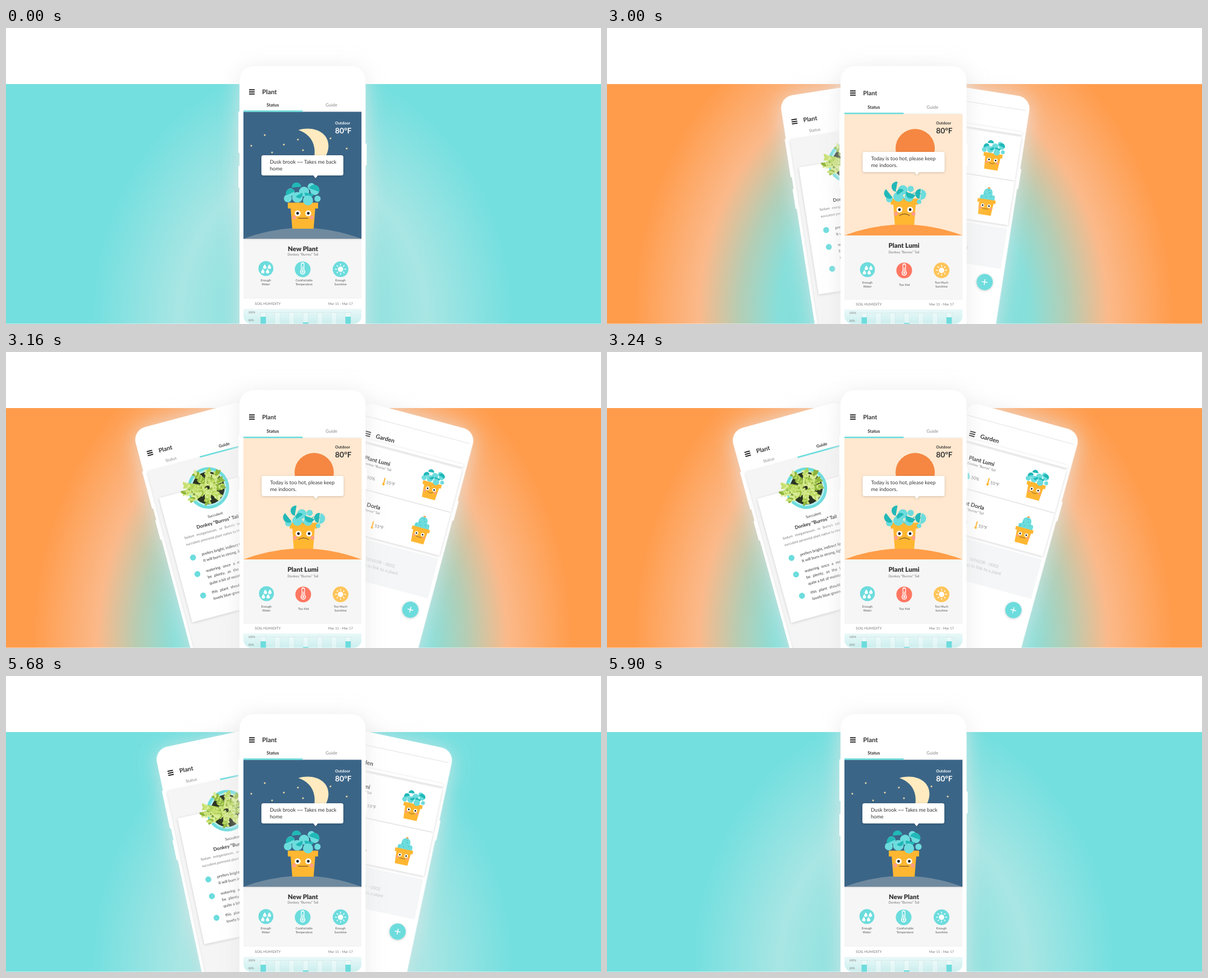
Recreate the animation shown at these times as an HTML page. Size 1060x528 px, loop 7.94 s.

```html
<!DOCTYPE html>
<html lang="en">
<head>
<meta charset="utf-8">
<title>Plant app</title>
<style>
  html, body { margin: 0; width: 100%; height: 100%; overflow: hidden; background: #fff; }
  svg { display: block; width: 100vw; height: 100vh; }
  text { font-family: Lato, "Open Sans", sans-serif; text-rendering: geometricPrecision; white-space: pre; }
  .phone { filter: drop-shadow(0 3px 18px rgba(230, 230, 230, .8)); }
  .raised { filter: drop-shadow(0 1px 2px rgba(0, 0, 0, .18)); }
</style>
</head>
<body>
<svg id="stage" viewBox="0 0 1060 528" preserveAspectRatio="none"></svg>
<script>
const TEAL = '#6ddcdd', DARK_TEAL = '#22b8b8', INK = '#333', GREY = '#777', ORANGE = '#ffb732';
const LOOP = 7940, FAN_ANGLE = 15.4;

// Drawing helpers; text is placed by its vertical centre.
const text = (x, y, s, size, { w = 400, c = INK, a = 'start', ws = 0 } = {}) =>
  `<text x="${x}" y="${y + size * .35}" font-size="${size}" font-weight="${w}" fill="${c}" text-anchor="${a}" word-spacing="${ws}">${s}</text>`;
const mid = (x, y, s, size, o = {}) => text(x, y, s, size, { ...o, a: 'middle' });
const rect = (x, y, w, h, c, extra = '') => `<rect x="${x}" y="${y}" width="${w}" height="${h}" fill="${c}" ${extra}/>`;
const dot = (x, y, r, c) => `<circle cx="${x}" cy="${y}" r="${r}" fill="${c}"/>`;
const path = (d, c, extra = '') => `<path d="${d}" fill="${c}" ${extra}/>`;
const line = (d, c, w = 1) => path(d, 'none', `stroke="${c}" stroke-width="${w}" stroke-linecap="round"`);
const group = (transform, s) => `<g transform="${transform}">${s}</g>`;
const raised = s => `<g class="raised">${s}</g>`;
const half = (x, y, r, turn, c) =>
  group(`translate(${x} ${y}) rotate(${turn})`, path(`M${-r} 0A${r} ${r} 0 0 1 ${r} 0Z`, c));
const menu = (x, y) => [-3.7, 0, 3.7].map(d => rect(x - 5, y + d - .9, 10, 1.8, '#111')).join('');

const pot = () => path('M507 321H551L548 358H510Z', ORANGE) + rect(502, 311.5, 54, 10.5, ORANGE, 'rx="1"');

function face(x, y, mouth) {
  const eye = dx => dot(x + dx, y, 5.3, '#fff') + dot(x + dx, y, 2.4, '#222');
  const cheek = dx => dot(x + dx, y + 7.5, 3.4, '#ff9d88');
  return cheek(-15.5) + cheek(15.5) + eye(-9.5) + eye(9.5) + line(mouth, '#5b3a1c', 1);
}

const leaves = (discs, halves) =>
  discs.map(d => dot(...d, TEAL)).join('') + halves.map(h => half(...h, DARK_TEAL)).join('');

function happyPlant(mouth) {
  return leaves(
    [[502, 304, 7], [507, 293, 7], [519, 302, 9.5], [531, 292, 9], [544, 283, 6.5], [550, 290, 8], [555, 304.5, 5.5]],
    [[517.5, 284, 8.5, -5], [507, 295, 8.5, -25], [549, 289, 9.5, 20], [540, 295, 8, 190], [522, 297, 6.5, 150]]) +
    pot() + dot(538, 307.5, 9, TEAL) + face(529, 330.5, mouth);
}

function sadPlant() {
  const stems = line('M524 308Q518 290 510 290M535 306Q548 288 559 296M530 306Q524 294 520 290', DARK_TEAL, 1.2);
  return group('translate(530 351) scale(.91 1) translate(-529 -358)', pot()) + stems +
    leaves([[527, 289, 8.5], [541, 287, 5.5], [519, 301, 9], [503, 305, 6], [538, 302, 8], [556, 310, 4]], []) +
    half(559, 297, 9.5, 98, TEAL) +
    leaves([], [[516, 283, 9, -80], [503, 295, 9.5, 232], [523, 294, 7, -35], [541, 295, 9, 200], [558, 296, 9, -82]]) +
    face(530.5, 324, 'M521 334.5Q530 328.5 539 334.5');
}

function cactus() {
  const spots = [[-5, -8], [3, -13], [6, -4], [-2, -1], [-9, 0], [1, -19]];
  const body = path('M-12 6V-2Q-11-7-7-6V-13Q-6-24 1-24Q8-23 8-12V-8Q13-9 13-3V6Z', TEAL) +
    spots.map(([x, y]) => dot(x, y, .9, DARK_TEAL)).join('') + dot(1, -25, 2.2, '#ffa95c');
  return group('translate(0 -5) scale(1.05 .7)', body) +
    group('scale(.6) translate(-529 -314.5)', pot() + face(529, 330.5, 'M521 340H537'));
}

function waterIcon(x, y) {
  const drop = (dx, dy) => path(`M${x + dx} ${y + dy - 4.5}q6 8 0 8.2q-6-.2 0-8.2`, '#fff');
  return dot(x, y, 13.3, TEAL) + drop(-2, -3) + drop(6.2, -3) + drop(-5.5, 5) + drop(3, 5);
}

const thermometer = (x, y, c) =>
  line(`M${x} ${y - 8}V${y + 5}`, '#fff', 6) + dot(x, y + 6, 4.7, '#fff') +
  line(`M${x} ${y - 7.5}V${y + 5}`, c, 3.4) + dot(x, y + 6, 3, c) +
  line(`M${x} ${y - 3}V${y + 5}`, '#fff', 1.3) + dot(x, y + 6, 1.7, '#fff');

function sunIcon(x, y, c) {
  let rays = '';
  for (let i = 0; i < 8; i++) {
    const a = i * Math.PI / 4, p = r => `${x + r * Math.cos(a)} ${y + r * Math.sin(a)}`;
    rays += `M${p(7)}L${p(9.3)}`;
  }
  return dot(x, y, 14, c) + dot(x, y, 4.8, '#fff') + line(rays, '#fff', 1.4);
}

function star(x, y) {
  let d = '';
  for (let i = 0; i < 10; i++) {
    const a = i * Math.PI / 5, r = i % 2 ? 1 : 2.3;
    d += `${i ? 'L' : 'M'}${x + r * Math.sin(a)} ${y - r * Math.cos(a)}`;
  }
  return path(d + 'Z', '#ffe6ab');
}

function bubble(x, y, lines) {
  return raised(rect(x, y, 146, 36, '#fff', 'rx="3.5"') + path(`M${x + 92} ${y + 35.5}h9l-4.5 5.5z`, '#fff')) +
    lines.map((s, i) => text(x + 15, y + 11.5 + i * 12, s, 9.15)).join('');
}

function chart(y) {
  let s = rect(423, y, 210.5, 40, 'url(#chartBg)');
  s += line(`M446 ${y + 6.5}H618M446 ${y + 20.5}H618`, '#d5eaea', .6);
  const tops = [14, 0, 0, 24, 0, 0, 14];
  tops.forEach((top, i) => {
    const x = 453.5 + i * 25.2;
    s += rect(x, y + 6.5, 9.5, 40, '#fff', 'fill-opacity=".35" stroke="#cfe5e6" stroke-width=".6"');
    if (top) s += rect(x, y + top, 9.5, 40, TEAL);
  });
  return s + text(431.5, y + 6.5, '100%', 5, { c: GREY }) + text(432, y + 20.5, '80%', 5, { c: GREY });
}

function phoneBody(x, y, w, k) {
  const r = 25 * k, button = (bx, by, h) => rect(bx, y + by * k, 4, h * k, '#fff', 'rx="1"');
  return `<g class="phone">${rect(x, y, w, 900, '#fff', `rx="${r}"`)}${button(x - 2, 81, 74)}${button(x - 2, 178, 39)}${button(x + w - 2, 138, 39)}</g>`;
}

function screen(v) {
  const label = (x, lines, y) => lines.map((s, i) => mid(x, y + i * 7, s, 5.5, { c: '#555' })).join('');
  return menu(438, v.head) + text(456.3, v.head, 'Plant', v.titleSize, { w: 700 }) +
    mid(475.3, v.tabs, 'Status', 8, { w: 700 }) + mid(579.8, v.tabs, 'Guide', 8, { c: '#888' }) +
    raised(rect(423, v.top, 210.5, v.bottom - v.top, v.sky)) +
    rect(423, v.top - 2.5, 105.5, 2.6, TEAL) + v.scene +
    path(`M423 ${v.bottom}Q528 ${v.bottom - 39} 633.5 ${v.bottom}Z`, v.hill) +
    text(586.3, 170, 'Outdoor', 7, { w: 700, c: v.weather }) + text(586.3, 183.5, '80°F', 13.7, { w: 700, c: v.weather }) +
    bubble(v.bubbleX, v.bubbleY, v.speech) + v.plant +
    rect(423, v.bottom, 210.5, v.panelEnd - v.bottom, '#f6f6f6') +
    rect(423, v.bottom, 210.5, v.edge, 'url(#edge)') +
    mid(529, v.name, v.title, 11.5, { w: 900 }) + mid(529, v.sub, 'Donkey “Burros” Tail', 6.2, { c: GREY }) +
    waterIcon(v.ix, v.iy) + label(v.ix, ['Enough', 'Water'], v.labels) +
    dot(v.ix + 65.5, v.iy + 1.5, 14, v.heat) + thermometer(v.ix + 65.5, v.iy, v.heat) + label(...v.heatLabel) +
    sunIcon(596, v.iy + 1.3, v.sun) + label(596, v.sunLabel, v.labels) +
    line(`M423 ${v.panelEnd}H633`, '#eee', .8) +
    text(443.3, v.soil, 'SOIL HUMIDITY', 6.3, { c: GREY }) + text(574, v.soil, 'Mar 11 - Mar 17', 6.1, { c: GREY }) +
    chart(v.soil + 9);
}

const stars = [[461, 191], [437, 210], [495, 208], [520, 199], [529, 218], [474, 222], [578, 197], [607, 215]];
const night = screen({
  head: 114, titleSize: 11.4, tabs: 137, top: 149.5, bottom: 376, edge: 3, sky: '#3b6587', hill: '#6f8a9f', weather: '#fff',
  scene: stars.map(p => star(...p)).join('') +
    path('M521 182C548 174 575 186 574.5 211C574 225 566 237 556 242L547 240C553 220 552 193 521 182Z', '#ffebbf'),
  bubbleX: 455, bubbleY: 227, speech: ['Dusk brook ~~ Takes me back', 'home'],
  plant: happyPlant('M520.5 339.3H538'), name: 394, title: 'New Plant', sub: 404, panelEnd: 482, soil: 492,
  ix: 463, iy: 429, labels: 450, heat: TEAL, heatLabel: [531, ['Comfortable', 'Temperature'], 450],
  sun: TEAL, sunLabel: ['Enough', 'Sunshine']
});
const day = screen({
  head: 116, titleSize: 10.8, tabs: 141, top: 153.5, bottom: 370, edge: 0, sky: '#ffe8cf', hill: '#ff9d48', weather: INK,
  scene: dot(549, 215, 35, '#f58742'),
  bubbleX: 455.5, bubbleY: 221, speech: ['Today is too hot, please keep', 'me indoors.'],
  plant: sadPlant(), name: 388, title: 'Plant Lumi', sub: 400, panelEnd: 484, soil: 493,
  ix: 464, iy: 431, labels: 454, heat: '#ff7762', heatLabel: [530, ['Too Hot'], 458],
  sun: '#ffc55a', sunLabel: ['Too Much', 'Sunshine']
});

// Potted succulent: thick stalks of overlapping leaves around a dark centre.
function succulent() {
  let seed = 7;
  const rnd = () => (seed = seed * 16807 % 2147483647) / 2147483647;
  const tips = [[-45, -2], [-40, -15], [-35, 13], [-16, -31], [7, -30], [23, -23], [25, 4], [15, 21], [-8, 25], [-20, 7], [26, -9]];
  const greens = ['#8fb53c', '#b2d355', '#c6e070', '#daec98'];
  let s = dot(0, 0, 37, TEAL) + dot(0, 0, 32, '#b6eef0') + dot(0, 0, 29, '#2b3322');
  for (const [tx, ty] of tips) {
    const angle = Math.atan2(ty, tx) * 180 / Math.PI;
    for (let i = 0; i < 18; i++) {
      const k = .2 + i * .045, side = i % 2 ? 1 : -1;
      s += `<ellipse rx="5.5" ry="2.5" fill="${greens[Math.floor(rnd() * 4)]}" transform="translate(${tx * k} ${ty * k}) rotate(${angle + side * (25 + rnd() * 40)}) translate(2 0)"/>`;
    }
  }
  return s;
}

function guidePhone() {
  const item = (y, lines) => dot(46, y, 5.3, TEAL) +
    lines.map(([s, ws], i) => text(62.3, y - 1.5 + i * 11.6, s, 6.9, { ws })).join('');
  return phoneBody(0, 0, 209.5, .93) + menu(20, 47) + text(36, 47, 'Plant', 10.8, { w: 700 }) +
    mid(53.3, 67.5, 'Status', 7.5, { c: '#888' }) + mid(151.5, 67, 'Guide', 7.5, { w: 700 }) +
    raised(rect(7, 78, 196, 800, '#f5f5f5')) + rect(104, 75.5, 99, 2.7, TEAL) +
    raised(rect(15, 129, 179, 229.5, '#fff')) +
    group('translate(104.5 134)', succulent()) +
    mid(104, 183.5, 'Succulent', 6.5) + mid(104.7, 196.5, 'Donkey “Burros” Tail', 8.5, { w: 700 }) +
    text(40, 209.5, 'Sedum morganianum, or Burro’s tail, is a', 6.1, { c: GREY, ws: 2.5 }) +
    text(40, 221.5, 'succulent perennial plant native to Honduras', 6.1, { c: GREY }) +
    item(247, [['prefers bright, indirect light.', 0], ['It will burn in strong, light', 0]]) +
    item(277.5, [['watering once a month', 2.5], ['be plenty, as the leaves', 2.5], ['quite a bit of moisture', 0]]) +
    item(317, [['this plant should have', 2.5], ['lovely blue-green leaves', 0]]);
}

function gardenPhone() {
  const card = (y, name, art) => raised(rect(14, y, 196, 79, '#fff')) +
    text(36.5, y + 24, name, 10, { w: 700 }) + text(36.5, y + 34, 'Donkey “Burros” Tail', 5.8, { c: GREY }) +
    path(`M43 ${y + 50}q9 12 0 12q-9 0 0-12`, TEAL) + text(49.5, y + 57, '50%', 7.6, { c: GREY }) +
    line(`M81 ${y + 51}V${y + 61}`, ORANGE, 2.2) + dot(81, y + 61.5, 2.2, ORANGE) +
    text(85, y + 57, '55°F', 7.6, { c: GREY }) + art;
  const lumi = group('translate(164 111.5) scale(.63) translate(-527.5 -316.5)', happyPlant('M521 338Q529 345 537 338'));
  return phoneBody(7, 0, 209.5, .93) + line('M14 24H210', '#ddd', .8) +
    menu(31, 54) + text(46, 54, 'Garden', 10.5, { w: 700 }) +
    raised(rect(14, 63, 196, 5, '#fff')) +
    card(72, 'Plant Lumi', lumi) + card(152, 'Plant Dorla', group('translate(166 193)', cactus())) +
    rect(14, 237, 196, 73, '#f4f6f7') +
    mid(112, 270, 'SENSOR - 0002', 7.6, { c: '#c2c7cb' }) + mid(112, 281, 'Tap to link to a plant', 7.8, { c: '#c2c7cb' }) +
    raised(dot(185, 337.5, 14.5, TEAL)) + line('M180.5 337.5H189.5M185 333V342', '#fff', 1.5);
}

const radial = (id, stops) =>
  `<radialGradient id="${id}" gradientUnits="userSpaceOnUse" cx="0" cy="0" r="1" gradientTransform="translate(528 520) scale(480 580)">` +
  stops.map(([o, c]) => `<stop offset="${o}" stop-color="${c}"/>`).join('') + '</radialGradient>';

const stage = document.getElementById('stage');
stage.innerHTML = `<defs>
  ${radial('nightBg', [[0, '#82e0de'], [.3, '#95e3e1'], [.46, '#a8e6e4'], [.78, '#74dfdf']])}
  ${radial('dayBg', [[.3, '#7fdfdd'], [.47, '#88dfda'], [.61, '#b5cdb4'], [.76, '#fbb98a'], [1, '#ff9c4c']])}
  <linearGradient id="chartBg" x2="0" y2="1"><stop stop-color="#eaf8f8"/><stop offset=".7" stop-color="#c9eeee"/></linearGradient>
  <linearGradient id="edge" x2="0" y2="1"><stop stop-color="#000" stop-opacity=".1"/><stop offset="1" stop-opacity="0"/></linearGradient>
  <clipPath id="screenClip"><rect x="423" y="68" width="210.5" height="459.5" rx="14"/></clipPath>
</defs>
<rect id="bg" y="100" width="1060" height="427.5"/>
<g id="fan"><g id="guide">${guidePhone()}</g><g id="garden">${gardenPhone()}</g></g>
${phoneBody(416, 68, 224.5, 1)}
<g clip-path="url(#screenClip)"><g id="night">${night}</g><g id="day">${day}</g></g>`;

const el = id => document.getElementById(id);
const show = (id, on) => el(id).setAttribute('display', on ? 'inline' : 'none');
const move = (id, value) => el(id).setAttribute('transform', value);

// Cubic curve (.25, .1) (.25, 1), solved by bisection.
function ease(u) {
  if (u <= 0) return 0;
  if (u >= 1) return 1;
  const curve = (s, a, b) => 3 * a * s * (1 - s) ** 2 + 3 * b * s * s * (1 - s) + s ** 3;
  let lo = 0, hi = 1;
  for (let i = 0; i < 24; i++) {
    const m = (lo + hi) / 2;
    if (curve(m, .25, .25) < u) lo = m; else hi = m;
  }
  return curve(lo, .1, 1);
}

function draw(now) {
  const time = now % LOOP, t = time - time % 20;
  const isDay = t >= 2900 && t < 5640;
  const angle = FAN_ANGLE * (ease((t - 2880) / 360) - ease((t - 5622) / 350));
  show('day', isDay);
  show('night', !isDay);
  show('fan', t >= 2900 && t < 5900);
  move('guide', `rotate(${-angle} 421 905) translate(428.8 115.2)`);
  move('garden', `rotate(${angle} 635 905) translate(417.7 115.2)`);
  el('bg').setAttribute('fill', isDay ? 'url(#dayBg)' : 'url(#nightBg)');
}

const start = performance.now();
(function tick() {
  draw(performance.now() - start);
  requestAnimationFrame(tick);
})();
</script>
</body>
</html>
```
